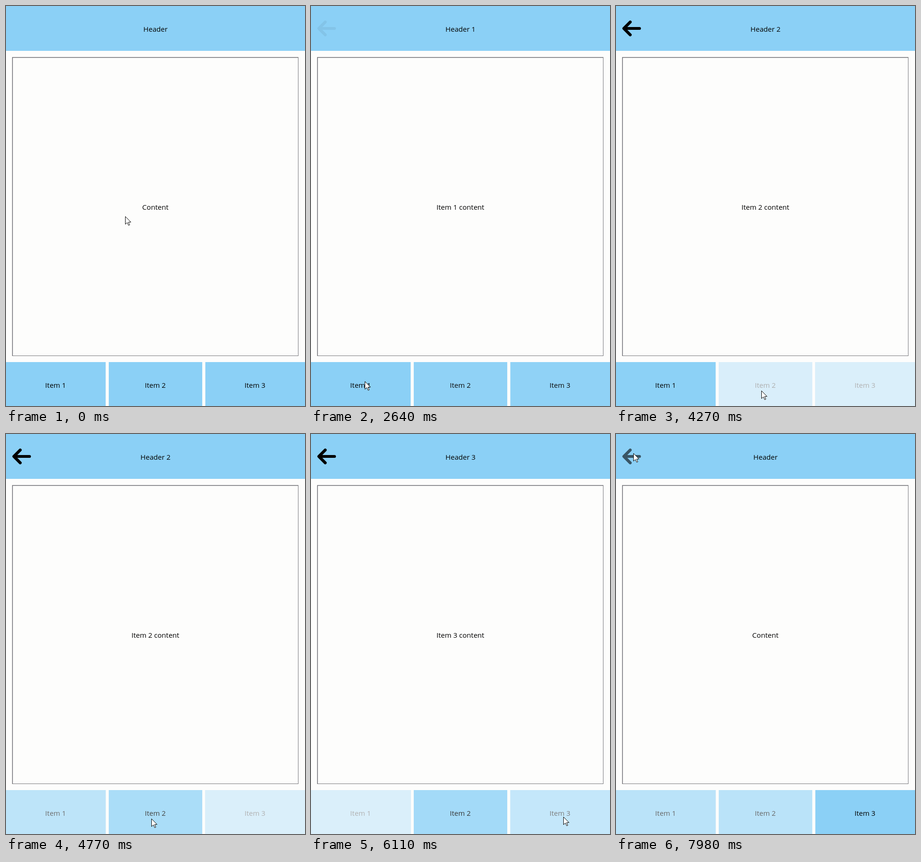
Recreate the animation shown at these times as an HTML page with a canvas. Size 640 by 856 pixels, loop 8 s.

```html
<!DOCTYPE html>
<html lang="en">
<head>
<meta charset="utf-8">
<title>Header, content and items</title>
<style>
  html, body { margin: 0; width: 100%; height: 100%; overflow: hidden; background: #fdfdfc; }
  canvas { display: block; }
</style>
</head>
<body>
<canvas id="stage" width="640" height="856"></canvas>
<script>
const ctx = document.getElementById('stage').getContext('2d');
const W = 640, H = 856, LOOP = 8000, FADE = 1500, DIM = 0.3;
const PAPER = '#fdfdfc', BLUE = '#8bd0f6', FRAME = '#77777c';

// each click selects an item; 0 means none
const clicks = [
  { t: 2530, item: 1 },
  { t: 4230, item: 2 },
  { t: 5810, item: 3 },
  { t: 7605, item: 0 }
];

// pointer glides from its last place to x, y
const start = { x: 255, y: 450 };
const glides = [
  { from: 1360, to: 2200, x: 115, y: 803 },
  { from: 3050, to: 4120, x: 311, y: 823 },
  { from: 4960, to: 5740, x: 540, y: 819 },
  { from: 6200, to: 6940, x: 156, y: 118 },
  { from: 6940, to: 7440, x: 37, y: 41 }
];

const mix = (a, b, u) => a + (b - a) * u;
const clamp = u => Math.min(1, Math.max(0, u));
const smooth = u => u * u * (3 - 2 * u);

// standard CSS "ease" curve
function ease(p) {
  if (p <= 0) return 0;
  if (p >= 1) return 1;
  let lo = 0, hi = 1, u = 0.5;
  for (let i = 0; i < 24; i++) {
    u = (lo + hi) / 2;
    const x = 0.75 * u * (1 - u) + u ** 3;
    if (x < p) lo = u; else hi = u;
  }
  return 0.3 * (1 - u) ** 2 * u + 3 * (1 - u) * u * u + u ** 3;
}

// value that fades to a new target after every click
function fade(t, first, target) {
  return clicks.reduce((v, c) => mix(v, target(c.item), ease((t - c.t) / FADE)), first);
}

function pointer(t) {
  return glides.reduce((p, g) => {
    const u = smooth(clamp((t - g.from) / (g.to - g.from)));
    return { x: mix(p.x, g.x, u), y: mix(p.y, g.y, u) };
  }, start);
}

function rect(color, x, y, w, h) {
  ctx.fillStyle = color;
  ctx.fillRect(x, y, w, h);
}

function label(text, x, y) {
  ctx.fillStyle = '#000';
  ctx.fillText(text, x, y);
}

function drawFrame() {
  rect(FRAME, 13, 109.4, 613, 639.6);
  rect(PAPER, 14.6, 111, 610.4, 637);
}

function drawArrow(alpha) {
  ctx.save();
  ctx.globalAlpha = alpha;
  ctx.strokeStyle = '#000';
  ctx.lineWidth = 6.2;
  ctx.lineCap = ctx.lineJoin = 'round';
  ctx.beginPath();
  ctx.moveTo(30.5, 34.2);
  ctx.lineTo(16.8, 48);
  ctx.lineTo(30.5, 61.8);
  ctx.moveTo(17, 48);
  ctx.lineTo(50.3, 48);
  ctx.stroke();
  ctx.restore();
}

// three equal columns, the middle one inset on both sides
function drawTile(i, alpha) {
  const col = W / 3, gap = i === 1 ? 6.6 : 0;
  const box = [i * col + gap, 762, col - 2 * gap, 94];
  rect(BLUE, ...box);
  label('Item ' + (i + 1), (i + 0.5) * col - 0.5, 817);
  ctx.globalAlpha = 1 - alpha;
  rect(PAPER, ...box);
  ctx.globalAlpha = 1;
}

function drawPointer({ x, y }) {
  ctx.save();
  ctx.translate(Math.round(x) + 0.5, Math.round(y) + 0.5);
  ctx.beginPath();
  for (const [px, py] of [[0, 0], [0, 16.5], [4, 13], [6.8, 19], [9.2, 18], [6.6, 12.2], [11.8, 12]])
    ctx.lineTo(px, py);
  ctx.closePath();
  ctx.fillStyle = '#fff';
  ctx.fill();
  ctx.strokeStyle = '#000';
  ctx.lineWidth = 1;
  ctx.stroke();
  ctx.restore();
}

function draw(t) {
  const item = clicks.reduce((s, c) => t >= c.t ? c.item : s, 0);

  rect(PAPER, 0, 0, W, H);
  rect(BLUE, 0, 0, W, 96);
  drawFrame();
  ctx.font = '15.1px "Open Sans", "Noto Sans", sans-serif';
  ctx.textAlign = 'center';
  label(item ? 'Header ' + item : 'Header', 320, 55);
  label(item ? 'Item ' + item + ' content' : 'Content', 319.7, 436);
  drawArrow(fade(t, 0, s => s ? 1 : 0));
  for (let i = 0; i < 3; i++)
    drawTile(i, fade(t, 1, s => !s || s === i + 1 ? 1 : DIM));
  drawPointer(pointer(t));
}

const begin = performance.now();
function tick() {
  draw((performance.now() - begin) % LOOP);
  requestAnimationFrame(tick);
}
tick();
</script>
</body>
</html>
```
